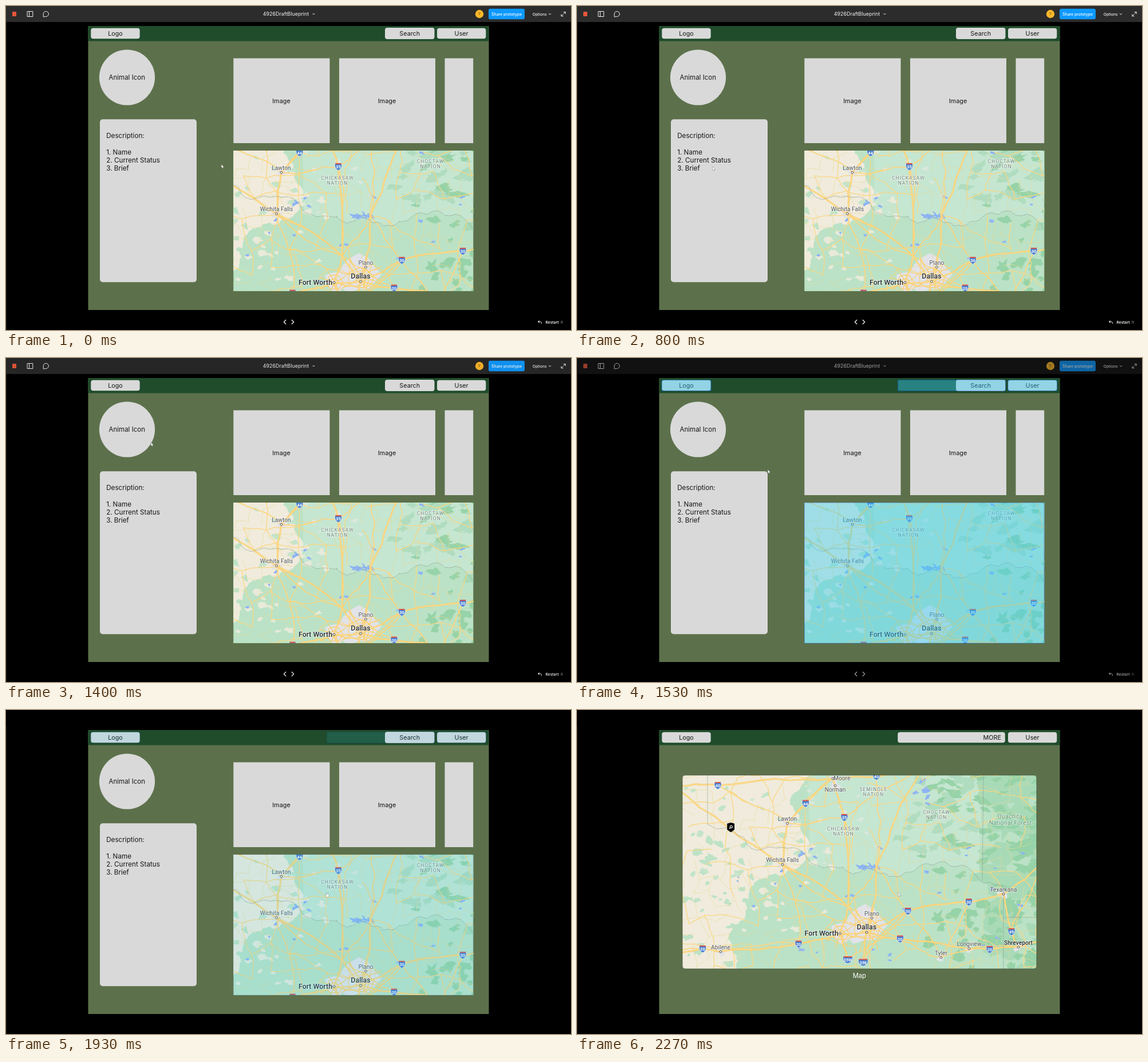
These frames come from a looping animation (987 px wide and 567 px high, 4670 ms). An HTML page:

```html
<!DOCTYPE html>
<html lang="en">
<head>
<meta charset="utf-8">
<title>Prototype walkthrough</title>
<style>
  html, body { margin: 0; width: 100%; height: 100%; overflow: hidden; background: #000; }
  svg { display: block; width: 100vw; height: 100vh; }
  text { font-family: Inter, "Liberation Sans", sans-serif; }
  .map text { font-family: Roboto, Arial, sans-serif; }
  .mid { text-anchor: middle; }
  .halo { paint-order: stroke; stroke: #fff; stroke-opacity: .6; stroke-width: 1.8; stroke-linejoin: round; }
  .line { fill: none; stroke-linejoin: round; stroke-linecap: round; }
</style>
</head>
<body>
<svg viewBox="0 0 987 567" xmlns="http://www.w3.org/2000/svg">
  <defs>
    <clipPath id="wide"><rect x="184" y="114" width="619" height="339" rx="5"/></clipPath>
    <clipPath id="small"><rect x="397.3" y="253" width="419" height="246"/></clipPath>
    <g id="map" class="map"></g>
  </defs>
  <rect width="987" height="567"/>
  <rect y="28" width="1" height="539" fill="#1c1c1c"/>
  <rect x="143.5" y="35" width="700" height="497" fill="#5c714b"/>
  <rect x="143.5" y="35" width="700" height="26.5" fill="#204c2c"/>
  <g id="detail"></g>
  <g id="overview"></g>
  <g id="hints"></g>
  <rect id="barBack" width="987" height="28" fill="#2c2c2c"/>
  <g id="chrome"></g>
  <g id="cursor" stroke="#222" stroke-opacity=".5" stroke-width=".5" fill="#fff" stroke-linejoin="round">
    <path id="arrow" d="M0 0V6.6L1.5 5.3 2.5 7.4 3.5 7 2.6 4.9H4.5Z"/>
    <path id="hand" d="M-.8 .3Q0-1 .8 .3V2.8L3 3.3V6L2 8H-1.2L-2.6 5V3.6L-.8 4.6Z"/>
  </g>
</svg>
<script>
const $ = id => document.getElementById(id);
const GRAY = '#d9d9d9', INK = '#161616';

const rect = (x, y, w, h, fill, rx = 0, more = '') =>
  `<rect x="${x}" y="${y}" width="${w}" height="${h}" rx="${rx}" fill="${fill}" ${more}/>`;
const text = (s, x, y, size, fill = INK, more = 'class="mid"') =>
  `<text x="${x}" y="${y}" font-size="${size}" fill="${fill}" ${more}>${s}</text>`;
const line = (d, color, width, more = '') =>
  `<path class="line" d="${d}" stroke="${color}" stroke-width="${width}" ${more}/>`;
const circle = (x, y, r, fill, more = '') =>
  `<circle cx="${x}" cy="${y}" r="${r}" fill="${fill}" ${more}/>`;
const area = (d, color) => `<path d="${d}" fill="${color}"/>`;

// ---- map geometry ----
let seed = 71;
const rnd = (a = 0, b = 1) => {
  seed = (seed * 1664525 + 1013904223) % 4294967296;
  return a + (b - a) * seed / 4294967296;
};
const fmt = p => p.map(v => v.toFixed(1)).join(' ');
const trace = pts => 'M' + pts.map(fmt).join('L');

// Midpoint displacement: turns a few key points into a natural line
function rough(pts, amp, depth = 3) {
  if (!depth) return pts;
  const out = [pts[0]];
  for (let i = 1; i < pts.length; i++) {
    const [a, b] = [pts[i - 1], pts[i]], k = rnd(-amp, amp);
    out.push([(a[0] + b[0]) / 2 - (b[1] - a[1]) * k, (a[1] + b[1]) / 2 + (b[0] - a[0]) * k], b);
  }
  return rough(out, amp, depth - 1);
}
function blob(x, y, r, flat = .7, tilt = 0, jag = .5) {
  const pts = [], n = 12, c = Math.cos(tilt), s = Math.sin(tilt);
  for (let i = 0; i < n; i++) {
    const a = i / n * 2 * Math.PI, k = r * rnd(1 - jag, 1 + jag);
    const u = Math.cos(a) * k, v = Math.sin(a) * k * flat;
    pts.push([x + u * c - v * s, y + u * s + v * c]);
  }
  return trace(pts) + 'Z';
}
// Blobs in a box; skew above 1 crowds them toward the right edge
function scatter(count, x0, y0, x1, y1, r0, r1, skew = 1, flat = .6) {
  let d = '';
  for (let i = 0; i < count; i++)
    d += blob(x1 - (x1 - x0) * rnd() ** skew, rnd(y0, y1), rnd(r0, r1), flat, rnd(-.7, .5));
  return d;
}
// Jittered lattice of local roads
function roadNet(step, jitter, keep) {
  const nodes = {}, node = (i, j) => nodes[i + ',' + j] ||= [
    184 + i * step + rnd(-jitter, jitter), 114 + j * step + rnd(-jitter, jitter)];
  let d = '';
  const join = (a, b, chance) => { if (rnd() < chance) d += trace(rough([a, b], .1, 2)); };
  for (let i = -1; i < 640 / step; i++)
    for (let j = -1; j < 360 / step; j++) {
      join(node(i, j), node(i + 1, j), keep);
      join(node(i, j), node(i, j + 1), keep);
      join(node(i, j), node(i + 1, j + 1), keep * .22);
    }
  return d;
}

// Towns are labelled, numbered points carry a road shield, the rest are plain junctions
const PLACES = {
  Moore: [447, 120], Norman: [451, 132.5], Lawton: [367.5, 198.3], 'Wichita Falls': [359, 270.5],
  Plano: [515, 364], Dallas: [506, 389], 'Fort Worth': [459.5, 391], Texarkana: [745, 322],
  Abilene: [251, 423], Tyler: [636, 433], Longview: [685, 417.5], Shreveport: [771, 415],
  i40: [246, 132], 'i40 east': [523, 116], i44: [399.3, 163.5], i35: [467, 188],
  i30: [578, 352], 'i30 east': [684.5, 336], 'i20 west': [219.5, 418], i20: [387, 409.5],
  'i20 mid': [564.5, 400.5], 'i20 east': [721, 419], i49: [759, 388], i35W: [473, 437], i35E: [500, 441.5],
  west: [170, 134], north: [600, 108], east: [815, 265], southeast: [815, 405], southwest: [170, 425],
  Denton: [474, 345], Texoma: [523, 274]
};
const HIGHWAYS = [
  'west,i40,Moore,i40 east,north', 'Moore,i44,Lawton,Wichita Falls', 'Moore,Norman,i35,Denton,Fort Worth,i35W',
  'Denton,Dallas,i35E', 'Dallas,Plano,Texoma,north', 'Dallas,i30,i30 east,Texarkana,east',
  'southwest,i20 west,Abilene,i20,Fort Worth,Dallas,i20 mid,Longview,i20 east,Shreveport,southeast',
  'Shreveport,i49,Texarkana', 'Wichita Falls,Denton', 'Wichita Falls,west'
];
const RIVER = [[228, 200], [290, 222], [304, 242], [390, 245], [408, 268], [465, 275], [482, 288], [505, 272],
  [545, 292], [600, 272], [645, 267], [708, 302], [745, 311]];
const PRAIRIE = [[436, 90], [372, 165], [404, 250], [356, 290], [300, 322], [284, 370], [263, 400], [272, 470]];

function shield(name, [x, y]) {
  const num = name.slice(1).split(' ')[0], w = num.length > 2 ? 8.6 : 6.2;
  return `<g transform="translate(${x} ${y})">` +
    `<path d="M${-w} -3Q${-w} 4 0 6.8Q${w} 4 ${w} -3L${w - 1} -5.5H${1 - w}Z" fill="#4a80cf" stroke="#eef3fb" stroke-width=".7"/>` +
    rect(1 - w, -6, 2 * w - 2, 2, '#d9564c') + text(num, 0, 3.2, 7.4, '#fff', 'class="mid" font-weight="700"') + '</g>';
}
function town(name, [x, y]) {
  const big = /Dallas|Fort/.test(name), bold = big || name === 'Shreveport';
  const [dx, dy] = { Moore: [16, 3], Norman: [0, 10.5], 'Fort Worth': [-32.5, 3.5] }[name] || [0, big ? -5.5 : -4.3];
  return text(name, x + dx, y + dy, big ? 12.4 : 10.2, bold ? '#282c30' : '#50555a',
    `class="mid halo" font-weight="${bold ? 500 : 400}"`) +
    circle(x, y, 1.9, '#fff', 'stroke="#4c5156" stroke-width="1"');
}
const nation = (name, x, y) => [name, 'NATION'].map((s, i) =>
  text(s, x, y + i * 9.2, 8.4, '#71827b', 'class="mid halo" letter-spacing="1.1"')).join('');
const park = (s, x, y) => text(s, x, y, 10.4, '#53906f', 'class="mid halo" letter-spacing=".25"');

function land(river) {
  const south = river.filter(p => p[0] > 404 && p[0] < 708);
  const edge = rough(PRAIRIE, .22, 4);
  return rect(180, 110, 630, 350, '#bbe2c6') +
    area(trace([[404, 100], ...south, [709, 100]]) + 'Z', '#c5e6d1') +
    area(scatter(60, 560, 110, 820, 265, 7, 17, 1.3, .45), '#b0dcbf') +
    area(scatter(50, 715, 110, 830, 460, 16, 30, 1, .8), '#a9dab7') +
    area(scatter(75, 600, 110, 815, 320, 5, 16, 1.9, .45), '#97d3a8') +
    area(scatter(55, 600, 320, 815, 455, 4, 13, 1.5, .75), '#97d3a8') +
    area(trace([...edge, [150, 470], [150, 90]]) + 'Z', '#f0ebdc') +
    area(scatter(40, 186, 215, 350, 445, 3, 10, .7), '#bde2c6') +
    area(scatter(22, 186, 118, 410, 300, 3, 8, .8), '#c2e4cb') +
    area(scatter(32, 290, 210, 450, 390, 3, 9), '#e9ead9') +
    area(scatter(16, 400, 120, 530, 275, 2, 6), '#dbe8dc');
}
function cities() {
  return area(Object.keys(PLACES).slice(0, 12).map(n => blob(...PLACES[n], 8, .8)).join('') +
    blob(503, 376, 33, .95, 0, .25) + blob(461, 387, 20, .9, 0, .3), '#e2e3e9');
}
function lakes() {
  let d = scatter(26, 390, 225, 780, 445, 2.5, 6, .9, .45) + scatter(6, 270, 270, 400, 350, 2, 5) +
    scatter(6, 590, 120, 620, 165, 3, 7, 1, .5);
  for (let i = 0; i < 4; i++) d += blob(498 + i * 8, 271 + rnd(-4, 6), 9, .4, rnd(-1, 1), .7);
  return area(d, '#8db4f4');
}
// Beltway and spokes around a city
function hub(x, y, r) {
  let d = blob(x, y, r * .45, .9, 0, .1) + blob(x, y, r, .9, 0, .1);
  for (let a = .3; a < 6.3; a += .78) {
    const at = k => [x + Math.cos(a) * k, y + Math.sin(a) * k];
    d += trace(rough([at(r * .3), at(r * 1.9)], .1));
  }
  return d;
}
function roads() {
  const sites = Object.values(PLACES);
  let trunks = '';
  sites.forEach((a, i) => sites.slice(i + 1).forEach(b => {
    const far = Math.hypot(a[0] - b[0], a[1] - b[1]);
    if (far > 75 && far < 165 && rnd() < .34) trunks += trace(rough([a, b], .09));
  }));
  const main = HIGHWAYS.map(s => trace(rough(s.split(',').map(n => PLACES[n]), .05))).join('');
  return line(roadNet(25, 9, .34), '#e8d894', .7, 'opacity=".85"') +
    line(roadNet(42, 14, .6), '#fbd67f', 1.25) +
    line(trunks, '#f8cd6b', 1.7) + line(trunks, '#ffe09a', .8) +
    line(hub(506, 383, 21) + hub(460, 390, 14), '#fbcf6d', 1.3) +
    line(main, '#f6c65c', 2.7) + line(main, '#ffe096', 1.4);
}
function buildMap() {
  const river = rough(RIVER, .16);
  const border = trace([[228, 110], ...river, [745, 455]]) + 'M710 110L708 302M745 363H805';
  const labels = Object.entries(PLACES).map(([name, p]) =>
    /^i\d/.test(name) ? shield(name, p) : /^[A-Z]/.test(name) && !/Denton|Texoma/.test(name) ? town(name, p) : '');
  return land(river) + cities() + lakes() + roads() +
    line(border, '#8a9c95', .8, 'stroke-dasharray="1.8 1.9" stroke-linecap="butt"') + labels.join('') +
    nation('SEMINOLE', 518, 142) + nation('CHOCTAW', 628, 182) + nation('CHICKASAW', 465.5, 211) +
    park('Ouachita', 756.5, 189.5) + park('National Forest', 757, 201);
}

// ---- screens ----
const button = (s, x, w, y = 38.8, h = 18.4) => rect(x, y, w, h, GRAY, 4) + text(s, x + w / 2, 52, 10.8);
const nav = button('Logo', 148.3, 85.4) + button('User', 753, 85.3);

function buildDetail() {
  const photo = (x, w) => rect(x, 91.5, w, 148.5, GRAY);
  const rows = ['Description:', '', '1. Name', '2. Current Status', '3. Brief'];
  return nav + button('Search', 662, 86.5, 38, 20) +
    circle(211.5, 125, 48.6, GRAY) + text('Animal Icon', 211.3, 129, 11.5) +
    photo(397.3, 168.2) + photo(582, 168) + photo(766.5, 49.7) +
    text('Image', 481, 170, 10.9) + text('Image', 665.5, 170, 10.9) +
    rect(164, 198.2, 169, 285, GRAY, 5) +
    rows.map((s, i) => text(s, 175.2, 231.4 + i * 14.1, 11.7, INK, '')).join('') +
    '<g clip-path="url(#small)"><use href="#map" x="113.5" y="93"/></g>';
}
function buildOverview() {
  return nav + rect(560.3, 38.8, 187.5, 18.4, GRAY, 4) + text('MORE', 725.3, 52.2, 10.9) +
    '<g clip-path="url(#wide)"><use href="#map"/></g>' +
    rect(184, 114, 619, 339, 'none', 5, 'stroke="#3a4a34" stroke-width=".7"') +
    '<path d="M262.3 198.8L268.7 197 275.1 198.8V209.5L268.7 214 262.3 209.5Z"/>' +
    circle(269.3, 204.4, 2, 'none', 'stroke="#eee" stroke-width="1.1"') + line('M267.8 206L266.3 207.6', '#eee', 1.2) +
    text('Map', 493.3, 468.5, 11.2, '#fff');
}
function buildHints() {
  const box = (x, y, w, h) =>
    rect(x, y, w, h, 'rgb(50,205,246)', 1, 'fill-opacity=".9" stroke="#0a6be0" stroke-width="1.1"');
  return box(148, 38.5, 86, 19) + box(560.5, 38.5, 188, 19) + box(752.8, 38.5, 86, 19) + box(397.5, 253.5, 418.5, 245.5);
}
function buildChrome() {
  const w = '#f2f2f2', weight = n => `class="mid" font-weight="${n}"`;
  const chevron = (x, y) => line(`M${x - 1.7} ${y}l1.7 1.8 1.7-1.8`, w, 1);
  return rect(11, 10, 7, 8, '#e8553a', 1) +
    line('M37.5 9.5H46.8V18.5H37.5ZM40.6 9.5V18.5', w, 1) +
    line('M65.2 18.6V14A4.6 4.6 0 1 1 69.8 18.6Z', w, 1) +
    text('4926DraftBlueprint', 489, 17.2, 8.9, w) + chevron(537.5, 13.2) +
    circle(827, 14, 7.2, '#fbb829') + text('Y', 827, 16.4, 6.6, '#6b4a10') +
    rect(843, 4.7, 63, 18.6, '#0d99ff', 3) + text('Share prototype', 874.6, 16.5, 6.9, '#fff', weight(500)) +
    text('Options', 932.2, 16.5, 6.7, w, weight(500)) + chevron(950, 13.4) +
    line('M974.2 10.5H977.2V13.5M977 10.7L974.2 13.5M970 14.8V17.8H973M970.2 17.6L973 14.8', w, 1) +
    line('M488.8 549.5L485.4 553 488.8 556.5M499.3 549.5L502.7 553 499.3 556.5', w, 1.3) +
    line('M931.6 550.5L929.5 552.5 931.6 554.5M929.7 552.5H933.5Q935.6 552.5 935.6 555.6', w, 1) +
    text('Restart', 954, 555.6, 6.6, w, weight(600)) + text('R', 971, 555.6, 6.6, '#8a8a8a');
}

const build = { map: buildMap, detail: buildDetail, overview: buildOverview, hints: buildHints, chrome: buildChrome };
for (const id in build) $(id).innerHTML = build[id]();

// ---- motion ----
const LOOP = 4670, STEP = 1000 / 15;
// Pointer key points: time, x, y
const PATH = [
  [67, 376.3, 277], [400, 474.5, 194.5], [533, 474.5, 194.5], [800, 237, 281], [933, 193, 212],
  [1067, 213, 123.5], [1333, 213, 123.5], [1533, 333, 195], [1800, 561, 319.5]
];
const clamp = v => Math.max(0, Math.min(1, v));

function pointer(t) {
  let i = 0;
  while (i < PATH.length - 2 && t > PATH[i + 1][0]) i++;
  const [a, b] = [PATH[i], PATH[i + 1]], k = clamp((t - a[0]) / (b[0] - a[0]));
  return [a[1] + (b[1] - a[1]) * k, a[2] + (b[2] - a[2]) * k];
}
const show = (id, on) => { $(id).style.display = on ? '' : 'none'; };

function draw(ms) {
  const t = Math.floor((ms % LOOP + 3.4) / STEP) * STEP;
  const moved = t > 2260, [x, y] = pointer(t);
  const overMap = !moved && x > 397 && y > 253;
  show('detail', !moved);
  show('overview', moved);

  const bar = clamp((1800 - t) / 430);
  $('chrome').setAttribute('opacity', bar);
  $('barBack').setAttribute('opacity', bar * bar);

  const hint = clamp((t - 1400) / 66) * clamp((2130 - t) / 600) * .47;
  $('hints').setAttribute('opacity', hint);

  $('cursor').setAttribute('transform', `translate(${fmt([x, y])})`);
  show('arrow', !overMap);
  show('hand', overMap);
}

let start;
function tick(now) {
  start ??= now;
  draw(now - start);
  requestAnimationFrame(tick);
}
draw(0);
requestAnimationFrame(tick);
</script>
</body>
</html>
```
